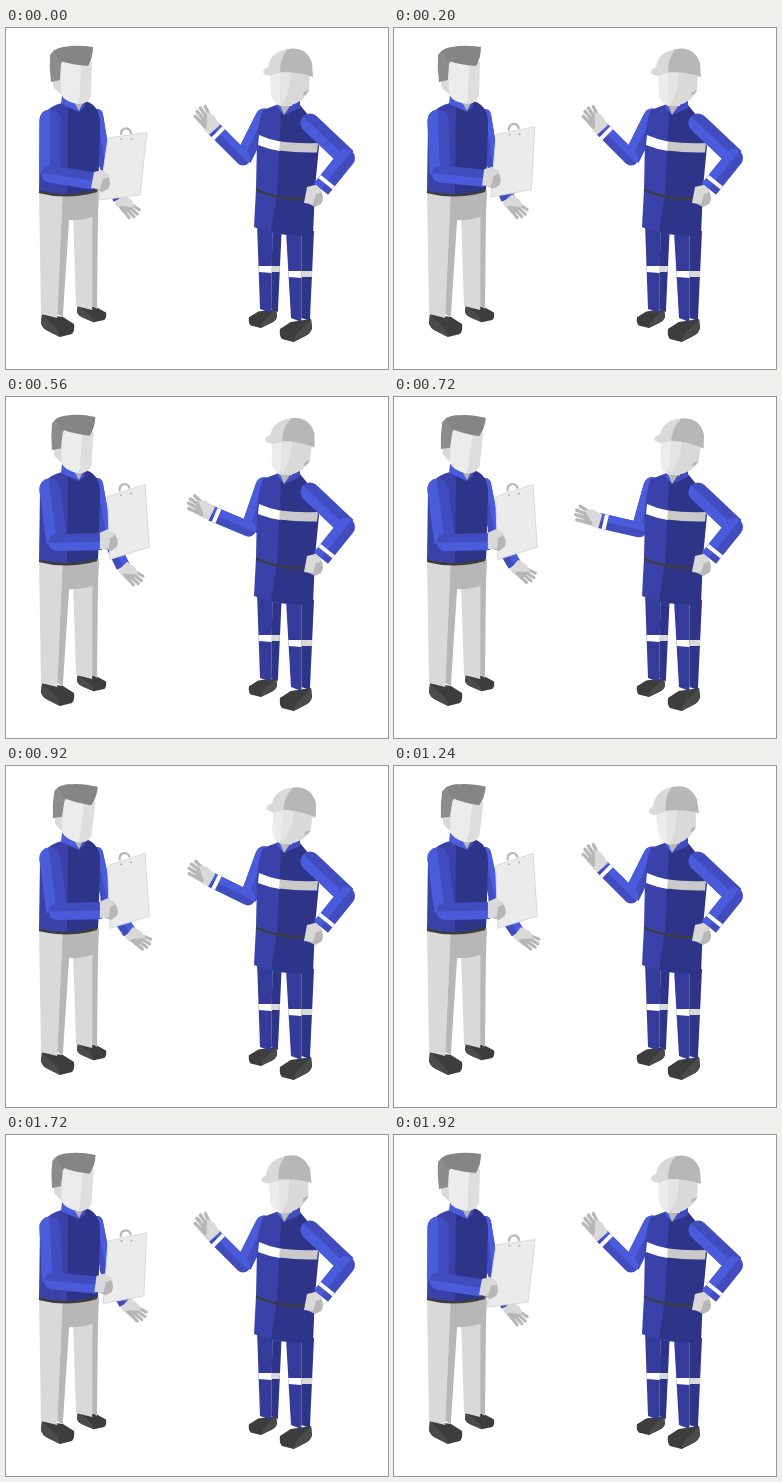
An HTML page for the animation above (2.8 s loop, 382 by 341 pixels).

```html
<!DOCTYPE html>
<html lang="en">
<head>
<meta charset="utf-8">
<title>Two workers talking</title>
<style>
  html, body { margin: 0; width: 100%; height: 100%; overflow: hidden; background: #fff; }
  svg { display: block; width: 382px; height: 341px; }
</style>
</head>
<body>
<svg id="stage" viewBox="0 0 382 341"></svg>
<script>
const LOOP = 2800, STEP = 40;
const C = {
  navy: '#2e3588', leg: '#343b9b', blue: '#3a42a9', mid: '#414dbe', bright: '#4a5bdc',
  white: '#fff', pale: '#ececec', soft: '#e4e4e4', light: '#d9d9d9', grey: '#b7b7b7',
  hair: '#8c8c8c', hairTop: '#858585', shoe: '#3d3d3d', toe: '#4b4b4b'
};
const stage = document.getElementById('stage');
const joints = [];

function add(parent, tag, attrs) {
  const node = document.createElementNS('http://www.w3.org/2000/svg', tag);
  for (const key in attrs) node.setAttribute(key, attrs[key]);
  return parent.appendChild(node);
}
const group = (parent, transform = '') => add(parent, 'g', { transform });
const fill = (parent, color, d) => add(parent, 'path', { fill: color, d });
const line = (parent, color, width, d) =>
  add(parent, 'path', { d, fill: 'none', stroke: color, 'stroke-width': width, 'stroke-linecap': 'round' });

// A group that turns about (x, y) by angle(t) degrees.
function joint(parent, x, y, angle) {
  const node = group(parent);
  joints.push({ node, x, y, angle });
  return node;
}

// Two-tone sleeve from a to b; the bright half lies on the given side.
function sleeve(parent, [ax, ay], [bx, by], r, side, stripe) {
  const len = Math.hypot(bx - ax, by - ay);
  const turn = Math.atan2(by - ay, bx - ax) * 180 / Math.PI;
  const g = group(parent, `translate(${ax} ${ay}) rotate(${turn})`);
  fill(g, C.mid, `M0 ${-r}H${len}V${r}H0A${r} ${r} 0 0 1 0 ${-r}Z`);
  fill(g, C.bright, `M0 0H${len}V${side * r}H0A${r} ${r} 0 0 ${side > 0 ? 1 : 0} ${-r} 0Z`);
  if (stripe) fill(g, C.white, `M${stripe} ${-r}h4V${r}h-4Z`);
}

// Open hand at the wrist, pointing along +x before it is turned.
function openHand(parent, x, y, turn, size, flip) {
  const g = group(parent, `translate(${x} ${y}) rotate(${turn}) scale(${size} ${size * flip})`);
  fill(g, C.grey, 'M3 -7L15 -7L17 5L8 7Z');
  for (let i = 0; i < 4; i++) {
    const y0 = 3.6 * i - 5;
    line(g, C.grey, 3.4, `M13 ${y0}L${22 + 3 * Math.sin(i)} ${y0 * 1.3 + 1}`);
  }
  fill(g, C.light, 'M-1 -7L-1 7L10 9L17 6L12 1L7 -3L5 -8Z');
}

function fist(parent, x, y, turn) {
  const g = group(parent, `translate(${x} ${y}) rotate(${turn})`);
  fill(g, C.grey, 'M-3 -6L6 -5Q10 2 6 8L0 11L-8 7Z');
  fill(g, C.light, 'M-8 -9L0 -11L7 -6L5 -3L1 -2L-2 8L-11 7Z');
}

// Tapered two-tone trouser leg, optionally with a reflective band.
function leg(parent, [x, y, w], [x2, y2, w2], split, front, side, band) {
  const mix = (a, b, k) => a + (b - a) * k;
  const edge = (k, s) => `${mix(x, x2, k) + mix(w, w2, k) * s} ${mix(y, y2, k)}`;
  const part = (color, s0, s1, k0, k1, sag) =>
    fill(parent, color, `M${edge(k0, s0)}L${edge(k0, s1)}L${edge(k1, s1)}l0 ${sag}L${edge(k1, s0)}Z`);
  part(front, 0, split, 0, 1, 4);
  part(side, split, 1, 0, 1, 3);
  if (band) {
    part(C.white, 0, split, band, band + .07, 1);
    part(C.light, split, 1, band, band + .07, 0);
  }
}

function shoe(parent, x, y, sx, sy) {
  const g = group(parent, `translate(${x} ${y}) scale(${sx} ${sy})`);
  fill(g, C.shoe, 'M1 0L0 9Q1 14 7 17L19 23L31 20Q34 17 33 10L22 3Z');
  fill(g, C.toe, 'M1 0L0 9Q1 14 7 17L19 23Q18 15 11 10Z');
}

const ease = u => (u = Math.min(1, Math.max(0, u)), u * u * (3 - 2 * u));
// Rises from 0 to 1 over a..b and falls back over c..d.
const hold = (t, a, b, c, d) => ease((t - a) / (b - a)) - ease((t - c) / (d - c));

const lift = t => hold(t, 0, 520, 1440, 1920);
const reach = t => hold(t, 320, 960, 1560, 1920);
const wave = t => hold(t, 320, 700, 760, 1120);
const nod = t => 5 * hold(t, 400, 720, 1540, 1920);
const glance = t => 5.5 * hold(t, 400, 680, 940, 1220) - 4 * hold(t, 940, 1220, 1600, 1920);

function manager() {
  const g = group(stage);
  shoe(g, 35, 286, 1, 1);
  shoe(g, 71, 277, .88, .75);
  leg(g, [67, 185, 25], [70, 278, 21], .77, C.light, C.grey);
  fill(g, C.grey, 'M57 166L93 162L92 186Q80 193 62 192Z');
  leg(g, [33, 163, 32], [35, 286, 22], .74, C.light, C.grey);

  const back = joint(g, 92, 88, t => -3 * reach(t));
  const low = joint(back, 99, 134, t => -9 * reach(t));
  sleeve(low, [99, 134], [114, 171], 7, -1);
  openHand(low, 114, 171, 50, .92, -1);
  sleeve(back, [91, 87], [99, 136], 6, -1);

  fill(g, C.blue, 'M56 75Q39 79 34 94L33 163Q60 172 92 162L94 95L77 73Z');
  fill(g, C.navy, 'M62 77L80 73Q94 78 94 95L92 162Q78 168 61 168Z');
  line(g, C.shoe, 2.4, 'M34 164Q60 171 90 163');
  fill(g, C.bright, 'M56 67L55 76L73 84L74 76Z');
  fill(g, C.mid, 'M73 84L79 79L78 70L73 75Z');
  fill(g, C.grey, 'M68 74L73 83L78 73Z');

  const head = joint(g, 68, 75, nod);
  fill(head, C.light, 'M46 50H55L57 68L48 60Z');
  fill(head, C.pale, 'M54 34H75L73 76Q58 74 55 66Z');
  fill(head, '#dedede', 'M75 34H86L85 68Q82 76 73 76Z');
  fill(head, C.hair, 'M44 27Q50 19 59 19L62 24L55 36L54 52L45 54Q43 40 44 27Z');
  fill(head, C.hairTop, 'M47 23Q62 15 87 19Q87 30 82 38Q67 37 54 33Z');

  const arm = joint(g, 44, 93, t => -7.5 * lift(t));
  sleeve(arm, [44, 92], [44, 146], 10.5, 1);
  const fore = joint(arm, 43, 144, t => -2.8 * lift(t));
  sleeve(fore, [44, 146], [88, 153], 8.5, 1);
  line(fore, C.grey, 2.2, 'M115 106a5 5 0 1 1 10 -1');
  add(fore, 'path', { d: 'M102 110L141 104.5L134 167L93 172Z', fill: '#ebebeb', stroke: C.light });
  for (const x of [115.5, 125.5]) add(fore, 'circle', { cx: x, cy: 111, r: 1.1, fill: C.grey });
  fist(fore, 96, 153, 0);
}

function worker() {
  const g = group(stage);
  shoe(g, 271, 281, -.85, .83);
  shoe(g, 306, 291, -.97, 1);
  leg(g, [251, 195, 25], [254, 281, 18], .62, C.leg, C.navy, .5);
  leg(g, [280, 203, 28], [285, 290, 19], .55, C.leg, C.navy, .46);

  const arm = joint(g, 256, 88, t => -11 * wave(t));
  sleeve(arm, [258, 89], [237, 131], 8.5, 1);
  const fore = joint(arm, 237, 130, t => -21 * wave(t));
  sleeve(fore, [237, 130], [208, 101], 7.5, 1, 33);
  openHand(fore, 208, 101, 228, 1, 1);

  fill(g, C.blue, 'M257 82L273 76L285 80L284 207Q264 206 248 199L250 161L251 115Q252 92 257 82Z');
  fill(g, C.navy, 'M275 82L294 77L303 88L313 118L309 160L307 208Q284 208 265 204L271 165Z');
  fill(g, C.white, 'M253 107Q264 112 276 114L274 123Q262 121 252 117Z');
  fill(g, '#c9c9c9', 'M274 113.5Q292 116 312 115L311 124.5Q291 125 273 122.5Z');
  line(g, C.shoe, 2.4, 'M251 162Q272 172 307 171');
  fill(g, C.bright, 'M273 72L271 79L278 87L280 80Z');
  fill(g, C.mid, 'M278 87L294 80L294 69L280 78Z');
  fill(g, C.grey, 'M274 77L278 87L284 78Z');

  const head = joint(g, 280, 78, glance);
  fill(head, C.light, 'M294 46H304L303 63L296 72L291 74Z');
  fill(head, C.grey, 'M298 64L303 62L301 66L297 68Z');
  fill(head, C.pale, 'M264 44L275 42L274 78Q267 75 265 67Z');
  fill(head, C.soft, 'M274 42H286V78H274Z');
  fill(head, C.light, 'M285 42L297 45L296 69Q293 78 274 78Q284 70 285 42Z');
  fill(head, C.light, 'M262 39Q264 24 282 21L293 23V44Q276 43 264 48L258 46Q255 42 262 39Z');
  fill(head, C.grey, 'M282 21Q300 18 306 35L307 49Q294 44 274 44Q274 29 282 21Z');

  sleeve(g, [304, 95], [341, 130], 9.5, 1);
  sleeve(g, [340, 130], [315, 161], 9, 1, 29);
  fist(g, 309, 168, 0);
}

manager();
worker();

const start = performance.now();
function draw(now) {
  const t = Math.floor(Math.max(0, now - start) % LOOP / STEP) * STEP;
  for (const { node, x, y, angle } of joints) {
    node.setAttribute('transform', `rotate(${angle(t).toFixed(3)} ${x} ${y})`);
  }
  requestAnimationFrame(draw);
}
draw(start);
</script>
</body>
</html>
```
